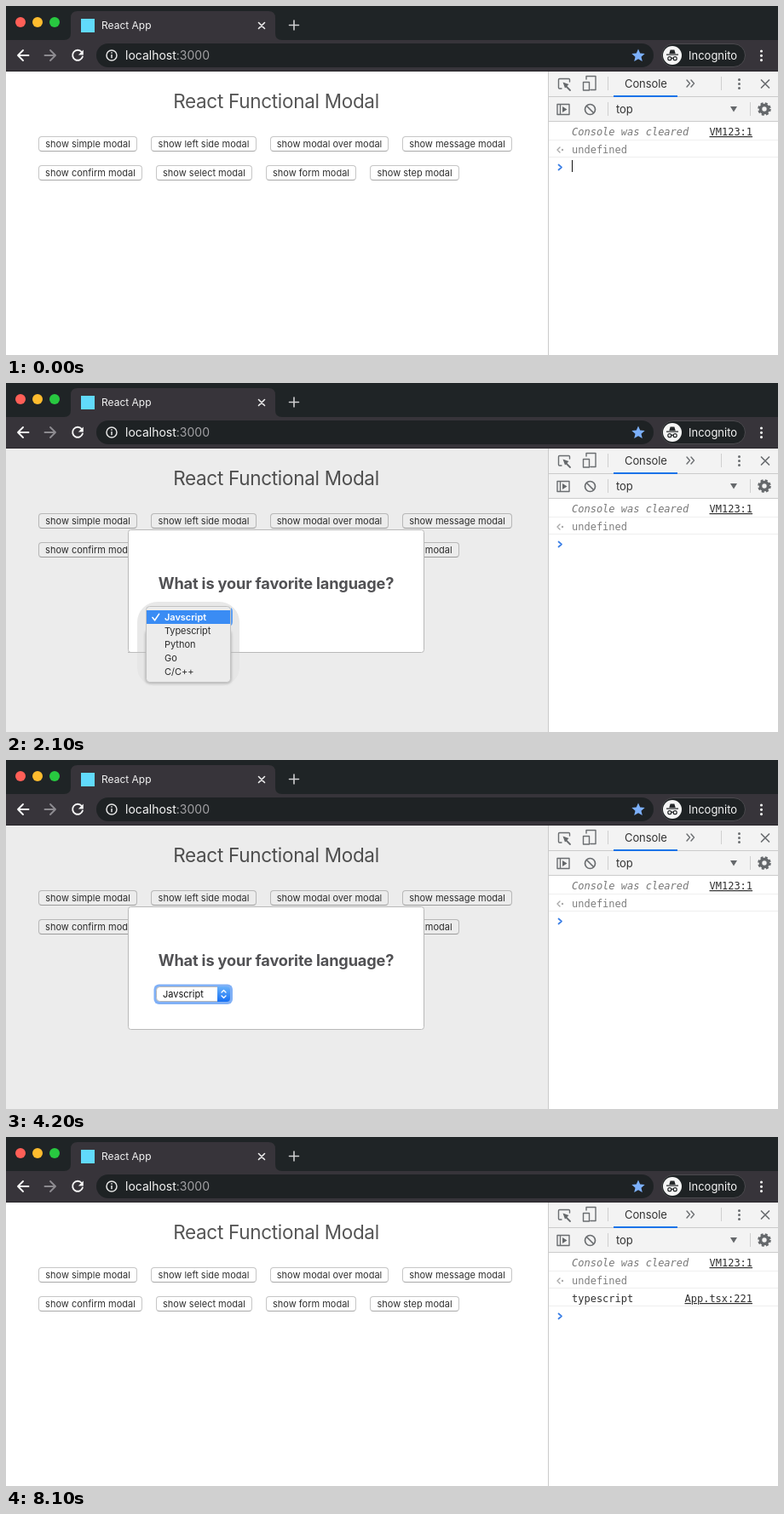
Write an HTML page that moves like this. It is 906 by 410 pixels and loops after 8500 ms.

```html
<!DOCTYPE html>
<html lang="en">
<head>
<meta charset="utf-8">
<title>React Functional Modal</title>
<style>
  :root { --loop: 8500ms; }
  html, body { margin: 0; width: 100%; height: 100%; overflow: hidden; background: #fff; }
  #stage { position: absolute; left: 0; top: 0; width: 906px; height: 410px; overflow: hidden; }
  svg { position: absolute; left: 0; top: 0; }
  #stage, text {
    font-family: Inter, Roboto, "Liberation Sans", sans-serif;
    font-optical-sizing: none;
  }
  .line { fill: none; stroke-linecap: round; stroke-linejoin: round; }
  .mono text { font: 12px "DejaVu Sans Mono", "Liberation Mono", monospace; fill: #303030; }
  .mono .link { text-decoration: underline; }

  .btn {
    position: absolute; box-sizing: border-box; height: 18px;
    border: 1px solid #c6c6c6; border-bottom-color: #a9a9a9; border-radius: 4px;
    background: #fff; color: #303030;
    font-size: 11px; line-height: 16px; text-align: center; white-space: nowrap;
  }
  .r1 { top: 153px; }
  .r2 { top: 187px; }

  /* hard changes */
  .caret, .log, .ask, .press, .ring, .hi, .first, .second {
    animation: var(--loop) step-end infinite;
  }
  .caret { animation-name: caret; }
  .press { animation-name: press; }
  .ring { animation-name: ring; }
  .hi { animation-name: hi; }
  .first { animation-name: first; }
  .second { animation-name: second; }
  .log { animation-name: log; }
  .ask { animation-name: ask; }
  @keyframes caret { 0% { opacity: 1 } 1.1% { opacity: 0 } }
  @keyframes press {
    0% { background: #fff; color: #303030; border-color: #c6c6c6 #c6c6c6 #a9a9a9 }
    1.1% { background: linear-gradient(#69b2fa, #1470f3); color: #fff; border-color: #3f8df0 }
    2.3% { background: #fff; color: #303030; border-color: #c6c6c6 #c6c6c6 #a9a9a9 }
  }
  @keyframes ring { 0% { opacity: 0 } 15.2% { opacity: 1 } }
  @keyframes hi { 0% { transform: none } 36.4% { transform: translateY(16px) } }
  @keyframes first { 0% { color: #fff; font-weight: 600 } 36.4% { color: #2c2c2c; font-weight: 400 } }
  @keyframes second { 0% { color: #2c2c2c; font-weight: 400 } 36.4% { color: #fff; font-weight: 600 } }
  @keyframes log { 0% { opacity: 0 } 50.5% { opacity: 1 } }
  @keyframes ask { 0% { transform: none } 50.5% { transform: translateY(21px) } }

  /* fades */
  .modal { animation: modal var(--loop) infinite; }
  .menu { animation: menu var(--loop) linear infinite; }
  @keyframes modal {
    0%, 4.47% { opacity: 0; animation-timing-function: ease }
    11.53%, 49.6% { opacity: 1; animation-timing-function: ease }
    52.9%, 100% { opacity: 0 }
  }
  @keyframes menu {
    0% { opacity: 0; animation-timing-function: step-end }
    15.2%, 46.8% { opacity: 1 }
    48.8%, 100% { opacity: 0 }
  }
</style>
</head>
<body>
<div id="stage">

  <!-- page -->
  <svg width="906" height="410">
    <text x="317" y="120" text-anchor="middle" font-size="22.5" letter-spacing="-.3" fill="#555">React Functional Modal</text>
  </svg>
  <div class="btn r1" style="left:38px;width:116px">show simple modal</div>
  <div class="btn r1" style="left:170px;width:124px">show left side modal</div>
  <div class="btn r1" style="left:310px;width:139px">show modal over modal</div>
  <div class="btn r1" style="left:465px;width:129px">show message modal</div>
  <div class="btn r2" style="left:38px;width:122px">show confirm modal</div>
  <div class="btn r2 press" style="left:176px;width:113px">show select modal</div>
  <div class="btn r2" style="left:305px;width:106px">show form modal</div>
  <div class="btn r2" style="left:427px;width:105px">show step modal</div>

  <svg width="906" height="410">
    <defs>
      <linearGradient id="blue" x2="0" y2="1">
        <stop stop-color="#6ab2fb"/><stop offset="1" stop-color="#156ff3"/>
      </linearGradient>
      <filter id="soft" x="-20%" y="-20%" width="140%" height="140%">
        <feGaussianBlur stdDeviation="1.5"/>
      </filter>
    </defs>

    <!-- dialog -->
    <g class="modal">
      <rect y="77" width="636" height="333" opacity=".075"/>
      <rect x="143.5" y="172.5" width="347" height="144" rx="3" fill="#fff" stroke="#b9b9b9"/>
      <text x="317" y="242" text-anchor="middle" font-size="18.2" font-weight="700" letter-spacing="-.16" fill="#515154">What is your favorite language?</text>
      <rect class="ring" x="173.5" y="263.5" width="92.5" height="23.5" rx="6" fill="#80b0f6"/>
      <rect x="176.5" y="266.5" width="86" height="17" rx="4" fill="#fff" stroke="#b8b8b8"/>
      <path d="M248 266h11a4 4 0 0 1 4 4v10a4 4 0 0 1-4 4h-11z" fill="url(#blue)"/>
      <path class="line" d="M253 273l2.5-2.5 2.5 2.5M253 277l2.5 2.5 2.5-2.5" stroke="#fff" stroke-width="1.3"/>
      <text x="184" y="279" font-size="11" fill="#111">Javscript</text>
    </g>

    <!-- option list -->
    <g class="menu" font-size="11">
      <path d="M154 317V281a24 24 0 0 1 24-24h72a24 24 0 0 1 24 24v36z" fill="#e8e8e8"/>
      <path d="M154 317h120v17a22 22 0 0 1-22 22h-76a22 22 0 0 1-22-22z" fill="#e6e6e6"/>
      <path d="M143 316.5h131" stroke="#bcbcbc"/>
      <rect x="163.5" y="290" width="101" height="63" rx="5" fill="#b0b0b0" filter="url(#soft)"/>
      <path d="M264 264q2 1 2 5v11q0 4-2 5z" fill="#5b9ff5"/>
      <rect x="164.5" y="262.5" width="99" height="89" rx="4" fill="#ececec" stroke="#c2c2c2"/>
      <rect class="hi" x="165" y="267" width="98" height="16" fill="#3a8cf4"/>
      <g class="first">
        <path class="line" d="M172 275.5l2.6 3.3 5-7.4" stroke="currentColor" stroke-width="1.6"/>
        <text x="186" y="279" fill="currentColor" letter-spacing="-.05">Javscript</text>
      </g>
      <g class="second"><text x="186" y="295" fill="currentColor" letter-spacing="-.08">Typescript</text></g>
      <g fill="#2c2c2c">
        <text x="186" y="311">Python</text>
        <text x="186" y="327">Go</text>
        <text x="186" y="343">C/C++</text>
      </g>
    </g>

    <!-- browser frame -->
    <rect width="906" height="41" fill="#1f2426"/>
    <rect y="40" width="906" height="37" fill="#37343a"/>
    <rect y="76" width="906" height="1" fill="#29262b"/>
    <path d="M68 40q8 0 8-8V14q0-8 8-8h224q8 0 8 8v18q0 8 8 8z" fill="#37343a"/>
    <circle cx="17" cy="19" r="6" fill="#ff5f57"/>
    <circle cx="37" cy="19" r="6" fill="#febc2e"/>
    <circle cx="57" cy="19" r="6" fill="#28c840"/>
    <rect x="88" y="15" width="16" height="16" fill="#61dafb"/>
    <text x="112" y="27" font-size="12" fill="#f4f4f4">React App</text>
    <path class="line" d="M296.500 19.500l7 7m0-7l-7 7" stroke="#eee" stroke-width="1.6"/>
    <path class="line" d="M332.500 22.500h11m-5.500-5.500v11" stroke="#cfcfd1" stroke-width="1.6"/>
    <g class="line" stroke="#f5f5f5" stroke-width="1.9">
      <path d="M26.500 58H14m6-6l-6 6 6 6"/>
      <path d="M45.500 58H58m-6-6l6 6-6 6" stroke="#8d8b90"/>
      <path d="M88.800 54a6 6 0 1 0 1.100 5.500"/>
    </g>
    <path d="M90.800 51.500v6h-6z" fill="#f5f5f5"/>
    <rect x="106" y="44" width="654" height="28" rx="14" fill="#1e2224"/>
    <circle cx="124" cy="58" r="6" fill="none" stroke="#e6e6e6" stroke-width="1.5"/>
    <path d="M124 57v4.300M124 54.200v1.600" stroke="#e6e6e6" stroke-width="1.500"/>
    <text x="140" y="63" font-size="14" fill="#f5f5f5">localhost<tspan fill="#a2a1a4">:3000</tspan></text>
    <path d="M742 50.500l2.200 5.100 5.500.5-4.200 3.600 1.300 5.400-4.800-2.900-4.800 2.900 1.300-5.400-4.200-3.600 5.500-.5z" fill="#7cb0fb"/>
    <rect x="769.500" y="44.500" width="98" height="27" rx="13.500" fill="#1e2224" stroke="#4b4a4e"/>
    <circle cx="782" cy="58" r="11" fill="#f5f5f5"/>
    <path d="M778.300 56l1.300-4.500h4.800l1.300 4.500zM775 56.500h14v1.200h-14z" fill="#26292b"/>
    <g class="line" stroke="#26292b" stroke-width="1.200">
      <circle cx="778.800" cy="61.700" r="2"/><circle cx="785.200" cy="61.700" r="2"/>
      <path d="M780.800 61.500q1.200-.8 2.400 0"/>
    </g>
    <text x="801" y="63" font-size="13" fill="#f5f5f5">Incognito</text>
    <path class="line" d="M886.500 53h0m0 5.300h0m0 5.300h0" stroke="#eee" stroke-width="3.200"/>

    <!-- developer tools -->
    <rect x="636" y="77" width="270" height="333" fill="#fff"/>
    <rect x="637" y="77" width="269" height="59" fill="#f3f3f3"/>
    <path d="M636.500 77v333M637 106.500h269M637 135.500h269" stroke="#cbcbcb"/>
    <path d="M706.500 83v16M839.500 83v16M706.500 113v16M873.500 113v16" stroke="#cfcfcf"/>
    <rect x="713" y="105" width="75" height="2" fill="#1a73e8"/>
    <g font-size="13" letter-spacing="-.1" fill="#333">
      <text x="726" y="96">Console</text>
      <text x="716" y="126">top</text>
    </g>
    <g class="line" stroke="#6a6d70" stroke-width="1.400">
      <path d="M652 97h-2.500q-1 0-1-1V86.500q0-1 1-1h11q1 0 1 1V89"/>
      <path d="M657 94l5 5" stroke-width="1.800"/>
      <path d="M681 86v-3.500h11v16h-6M677.500 89.500h7v9.500h-7z"/>
      <path d="M799 87l3.500 4-3.500 4m5-8l3.500 4-3.500 4"/>
      <path d="M886.500 87l9 9m0-9l-9 9" stroke-width="1.700"/>
      <path d="M647 115.500h14v12h-14zM650.500 115.500v12"/>
      <circle cx="685.500" cy="121.500" r="6" stroke-width="1.700"/>
      <path d="M681.500 117.500l8 8" stroke-width="1.700"/>
      <path d="M860.500 86.500h0m0 5h0m0 5h0" stroke-width="3"/>
    </g>
    <path d="M653.500 89.500l7 2.500-4.500 4.500zM653 118l5.500 3.500-5.500 3.500zM850 118h8l-4 6.500z" fill="#65686b"/>
    <g fill="none" stroke="#65686b">
      <circle cx="890" cy="121" r="4.500" stroke-width="3.600"/>
      <circle cx="890" cy="121" r="6.500" stroke-width="2.600" stroke-dasharray="2.900 2.205"/>
    </g>

    <g class="mono">
      <path d="M637 157.500h269M637 177.500h269" stroke="#efefef"/>
      <text x="664" y="152" font-style="italic" style="font-style:italic;fill:#777">Console was cleared</text>
      <text class="link" x="825.500" y="152">VM123:1</text>
      <path class="line" d="M650 166l-3 3 3 3" stroke="#a9a9a9" stroke-width="1.400"/>
      <circle cx="653" cy="169" r="1.200" fill="#a9a9a9"/>
      <text x="664" y="173" style="fill:#7d7d7d">undefined</text>
      <g class="log">
        <text x="664" y="194">typescript</text>
        <text class="link" x="796.500" y="194">App.tsx:221</text>
        <path d="M637 198.500h269" stroke="#efefef"/>
      </g>
      <path class="line ask" d="M648.500 186.500l3.500 3-3.500 3" stroke="#3b7fe6" stroke-width="1.700"/>
      <rect class="caret" x="664" y="181" width="1" height="14" fill="#111"/>
    </g>
  </svg>
</div>
</body>
</html>
```
